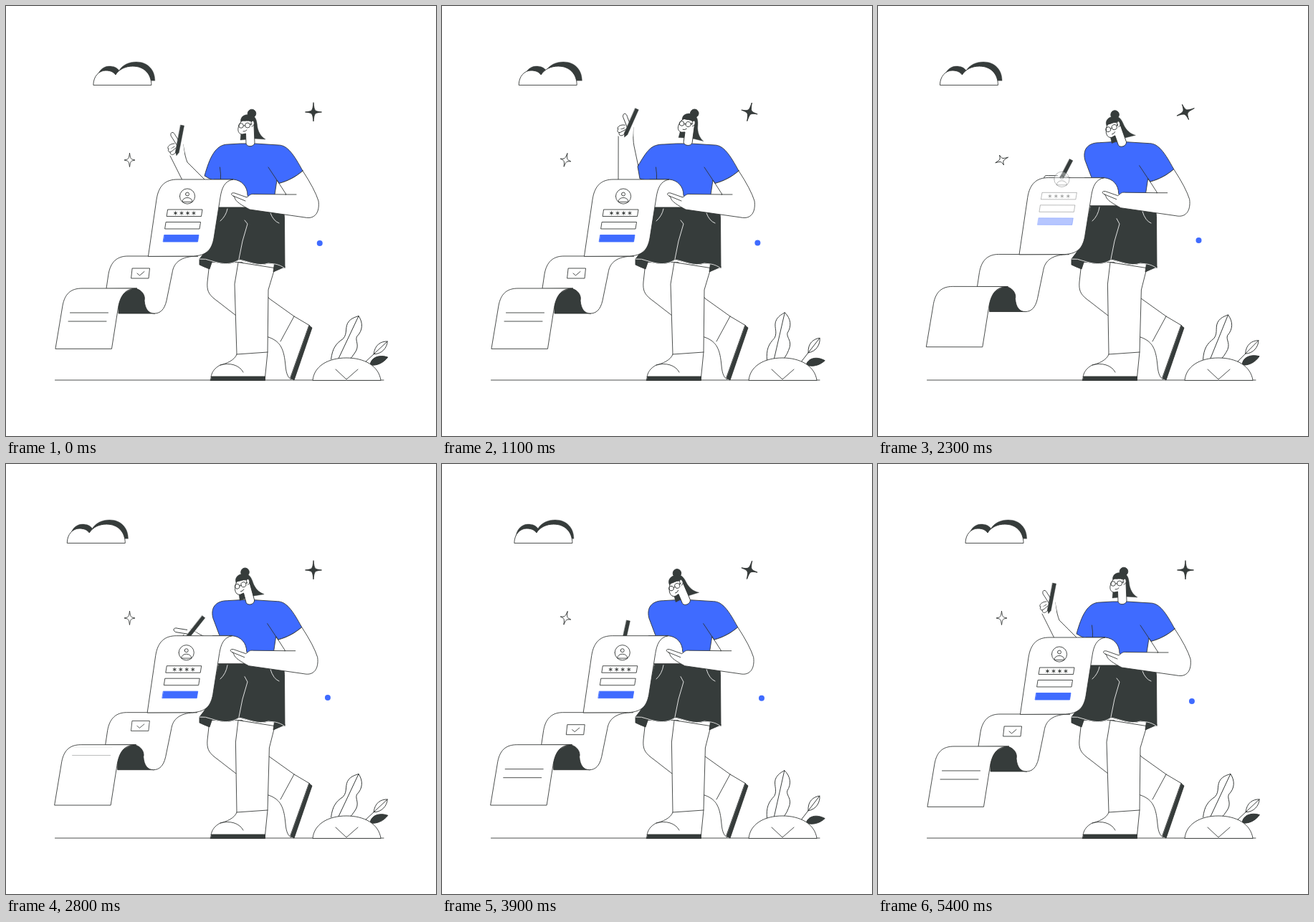
Recreate the animation shown at these times as an HTML page with a canvas. Size 600 px wide and 600 px high, loop 5500 ms.

```html
<!DOCTYPE html>
<html lang="en">
<head>
<meta charset="utf-8">
<title>Filling in the form</title>
<style>
html, body { margin: 0; width: 100%; height: 100%; overflow: hidden; background: #fff; }
canvas { display: block; width: 600px; height: 600px; }
</style>
</head>
<body>
<canvas id="stage" width="600" height="600"></canvas>
<script>
const LOOP = 5500, STEP = 100;
const INK = '#2c302f', DARK = '#363c3b', BLUE = '#3f6bff', WHITE = '#fff';
const ctx = document.getElementById('stage').getContext('2d');

// ---- timing helpers ----
const clamp = v => Math.min(1, Math.max(0, v));
const smooth = p => p * p * (3 - 2 * p);
const between = (t, a, b) => smooth(clamp((t - a) / (b - a)));
const pulse = (t, a, b, c, d) => between(t, a, b) - between(t, c, d);
const swing = (t, period, peak = 0) => Math.cos(2 * Math.PI * (t - peak) / period);

// ---- drawing helpers ----
function shape(d, fill, stroke = INK, width = 0.85) {
  const p = new Path2D(d);
  if (fill) { ctx.fillStyle = fill; ctx.fill(p); }
  if (stroke) { ctx.strokeStyle = stroke; ctx.lineWidth = width; ctx.stroke(p); }
}
const line = (d, stroke) => shape(d, null, stroke);
function circle(x, y, r, fill, stroke) {
  shape(`M${x - r},${y}a${r},${r} 0 1 1 ${2 * r},0a${r},${r} 0 1 1 ${-2 * r},0`, fill, stroke);
}
function at(x, y, deg, draw) {
  ctx.save();
  ctx.translate(x, y);
  ctx.rotate(deg * Math.PI / 180);
  draw();
  ctx.restore();
}
function faded(alpha, draw) {
  ctx.save();
  ctx.globalAlpha = clamp(alpha);
  draw();
  ctx.restore();
}

// ---- motion: how far each action has gone, 0 to 1 ----
function actions(t) {
  return {
    lift: pulse(t, 150, 1150, 1250, 1750),
    write: pulse(t, 1250, 1800, 4000, 4450),
    settle: pulse(t, 4000, 4450, 4600, 5400),
    pull: pulse(t, 1250, 1700, 1800, 2500),
    stroke: (1 - swing(t, 690, 1900)) / 2,
    nod: (1 - swing(t, 2050, 1900)) / 2
  };
}

// ---- scenery ----
function cloud(t) {
  const x = 18.5 * (swing(t, LOOP) - 1), back = 4.6 + 2.6 * swing(t, LOOP, LOOP / 4);
  const d = 'M122,110C122,98 130,90 139,90C146,90 150,92 153,96C158,88 167,84 177,84C193,84 203,95 203,110Z';
  at(x + back, -6, 0, () => shape(d, DARK, DARK, 0.4));
  at(x, 0, 0, () => shape(d, WHITE));
}

function star(x, y, rx, ry, t, fill) {
  const turn = 90 * (t % (LOOP / 2) / (LOOP / 2)) ** 2.2;
  at(x, y, turn, () => {
    ctx.beginPath();
    for (let i = 0; i <= 4; i++) {
      const a = i * Math.PI / 2, px = rx * Math.sin(a), py = -ry * Math.cos(a);
      const k = 1.3 * Math.SQRT2, b = a - Math.PI / 4;
      const cx = k * Math.sin(b), cy = -k * Math.cos(b);
      if (i) ctx.bezierCurveTo(cx, cy, cx, cy, px, py); else ctx.moveTo(px, py);
    }
    ctx.fillStyle = fill;
    ctx.strokeStyle = INK;
    ctx.lineWidth = 0.85;
    ctx.fill();
    ctx.stroke();
  });
}

function plant(t) {
  const sway = swing(t, LOOP / 2, 100);
  at(463, 494, 18.5 + 6.8 * sway, () => {
    shape('M-9,3C-14,-12 -12,-20 -6,-30C-3,-40 -12,-46 -9,-56C-7,-62 -3,-65 0,-68C10,-62 14,-52 10,-41C10,-34 20,-32 17,-18C16,-10 13,-4 9,3', WHITE);
    line('M0,0V-68');
  });
  at(500, 498, 42 + 5 * sway, () => {
    shape('M0,-18C-9,-28 -6,-38 0,-44C6,-38 8,-26 0,-18', WHITE);
    line('M0,0V-44');
  });
  at(508, 501, -20 + 7 * swing(t, LOOP / 2, 1050), () => shape('M0,0C5,-9 17,-9 27,0C18,5 8,5 0,0Z', DARK));
  shape('M428,522C430,502 450,491 475,491C500,491 520,502 523,522Z', WHITE);
  line('M460,507L475,521L491,507');
}

// ---- figure ----
function legs({ write }) {
  const knee = 1.4 * write;
  shape('M284,358L281,385C280,397 283,402 290,408L321,432L366,462C384,468 388,480 390,502C391,514 394,519 398,521L424,446L402,433L367,408L330,358Z', WHITE);
  line('M402,433L383,468');
  shape('M423,446L427,449L402,522L397,519Z', DARK);
  shape(`M324,358L${319 + knee},388L322,486C319,494 308,499 299,501C291,505 287,511 286,518H361.500L365,483L${366 + knee},396L375,366Z`, WHITE);
  line('M322,486L365,483M299,501C312,497 326,501 331,511');
  shape('M287,517H361.500V522.500H285.500Z', DARK);
}

function shorts({ write }) {
  const top = 281 - 2.3 * write;
  const hem = '366,359C352,364 338,356 325,354C312,363 298,359 288,356Q278,352 270,353';
  shape('M270,353V361Q276,364 284,367L288,355ZM389,364L373,371L375,356Z', DARK);
  shape(`M297,${top}H384Q388,${top + 3} 388.500,${top + 15}L389,366C380,359 372,360 ${hem}Q276,346 282,336Z`, DARK);
  line(`M389,366C380,359 372,360 ${hem}`, WHITE);
  line(`M333,${top + 18}L337,304L330,328L325,353M309,${top + 2}Q307,293 299,300M369,${top + 8}Q373,300 381,303`, WHITE);
}

function penArm({ lift, write, settle, stroke }) {
  const x = 240 + 19 * lift + 2 * settle + write * (13 + 3 * stroke);
  const y = 198 - 25 * lift - 7 * settle + write * (52 - 12 * stroke);
  const turn = 11 * lift + 8 * settle - write * (70 - 22 * stroke);
  const pen = 11 + 13 * lift + 17 * settle + write * (1 + 27 * stroke);
  const s = Math.sin(turn * Math.PI / 180), c = Math.cos(turn * Math.PI / 180);
  const near = (dx, dy) => `${x + dx * c - dy * s},${y + dx * s + dy * c}`;
  const elbow = dx => `${262 + dx + 14 * write},${243 + 20 * write}`;

  const inner = `${elbow(-16)}L${near(-11, 11)}`;
  const outer = `${near(7, -5)}Q${near(10, 13)} ${near(13, 20)}L${elbow(16)}`;
  shape(`M${inner}L${outer}Z`, WHITE, null);
  line(`M${inner}M${outer}`);
  at(x, y, turn, () => {
    shape('M-11,11L-14,-1L-4,-8H7L9,8Z', WHITE, null);
    shape('M-1,-3L-10,-17C-11,-23 -6,-23 -4,-18L3,-7', WHITE);
  });
  at(x, y, pen, () => shape('M-2.500,-32H2.500V6L0,11L-2.500,6Z', DARK, DARK, 0.4));
  at(x, y, turn, () => {
    shape('M-5,-6C-11,-6 -15,-2 -14,1C-13,3 -9,1 -5,-2', WHITE);
    shape('M-13,1C-15,5 -12,7 -9,5L-3,0', WHITE);
    line('M-11,6C-11,10 -7,11 -4,7L0,2');
  });
}

function torso({ lift, write, settle }) {
  const cuff = `${277 - 4 * lift - 3 * settle + 13 * write},${237 - 13 * lift - 20 * write}`;
  const pit = `${284 - 8 * lift - 3 * settle + 15 * write},241`;
  const curve = `${292 + 6 * write},193 ${284 + 3 * lift + 2 * write},${212 - 12 * lift - 13 * write}`;
  shape(`M327,192L310,193C${curve} ${cuff}L${pit}L299,246V280H340L375,263L378,243L381,247.500C394,244 405,238 414,230C402,208 393,194 380,194L348,192Z`, BLUE);
  line('M366,225L381,247.500');
  faded(1 - write, () => line('M298.500,225Q300,234 299.500,244'));
}

function head({ lift, write, settle, nod }) {
  const up = lift + settle;
  at(342 + 2 * up, 192 - up, 10 * up - write * (21 - 8 * nod), () => {
    ctx.translate(-342, -192);
    circle(343, 150, 5.8, DARK, DARK);
    shape('M328,164C325,154 334,150 341,152C350,153 350,163 351,170C353,178 357,183 362,186L346,185L327,187L328,176Z', DARK, DARK, 0.4);
    shape('M330,160C326,162 325,167 324,170C323,176 326,179 330,179L334.500,178L335,192C336,197 346,197 347,191L346,166L342,161C337,159 334,161 330,160Z', WHITE);
    shape('M342,166C341,161 345,158 346,162C347,165 345,168 343,168', WHITE);
    circle(328, 167, 3.3, null, INK);
    circle(337, 166.5, 3.5, null, INK);
    line('M340.500,165.500L343,164.500M331.400,167H333.400M331,175Q334,175.500 336,173');
  });
}

function frontArm() {
  shape('M414,230C405,238 394,244 381,247.500L391,263L346,262.500C341,262 340,264 336,267L319,261C314,260 313,263 317,265L319,267C320,273 329,278 340,284L417,295C431,298 438,288 436,272Q431,256 414,230Z', WHITE);
  line('M390,263H405M317,265L334,272');
}

// ---- paper ----
const slab = (x, y, w, h, fill, stroke) => shape(`M${x},${y}h${w}l-1.500,${h}h${-w}Z`, fill, stroke);

function form() {
  circle(253, 265.5, 10.6, WHITE, INK);
  circle(253, 262.5, 2.5, null, INK);
  line('M246,273C246,265.500 260,265.500 260,273Z');
  slab(226, 284, 48, 9.5, WHITE);
  for (let i = 0; i < 4; i++) {
    for (let a = 0; a < 180; a += 60) at(236.5 + i * 8.5, 289, a, () => line('M0,-2.300V2.300'));
  }
  slab(223.5, 301.5, 48, 9.5, WHITE);
  slab(221, 319.5, 48, 9.5, BLUE, BLUE);
}

function checkBox() {
  slab(176.5, 366, 24, 14, WHITE);
  line('M183,373L186.500,376L193,370.500');
}

// Printed matter slides down its sheet as it appears, and again as it goes.
function print(t, start, reach, draw) {
  const gone = between(t, 1250, 1700), p = between(t, start, start + 700);
  const leaving = t < 1900;
  const off = leaving ? 12 * gone : reach * (p - 1);
  faded(leaving ? 1 - gone : 1.3 * p, () => at(-0.22 * off, off, 0, () => draw()));
}

function paper(t) {
  // back of the roll, and the underside between the lower sheets
  shape('M290,242H317C329,243 337,252 337,264L345,281H290Z', WHITE);
  shape('M178,394C189,395 195,404 193,411C194,423 200,429 208,429H157V404Z', DARK);
  // middle, upper and lower sheet
  shape('M140,394L143,374C146,357 155,349 170,349H268C244,349 234,358 232,372L224,411C221,424 215,429 207,429C199,429 194,423 193,411C195,404 189,394 178,394Z', WHITE);
  shape('M198.500,349L210,270C213,250 223,242 239,242H317C305,244 301,254 299,267L290,324C287,340 280,348 262,349Z', WHITE);
  shape('M69,478L79,418C82,402 90,394 106,394H183C166,394 159,404 156,424L147.500,478Z', WHITE);

  print(t, 2150, 30, form);
  print(t, 2450, 18, checkBox);
  print(t, 2650, 44, () => line('M87,440h53'));
  print(t, 2800, 32, () => line('M89.500,428h53'));
}

// ---- stage ----
function render(t) {
  const act = actions(t);
  const bx = -1.3 * act.write, by = -2.3 * act.write;
  ctx.fillStyle = WHITE;
  ctx.fillRect(0, 0, 600, 600);
  cloud(t);
  star(429, 148, 11.5, 13, t, DARK);
  star(172.5, 215, 7.5, 9.5, t, WHITE);
  circle(443.3 - 5.7 * swing(t, LOOP, 300), 328.6 + 2.8 * swing(t, LOOP, 500), 4, BLUE, null);
  line('M68.500,522H527');
  plant(t);
  legs(act);
  shorts(act);
  penArm(act);
  at(bx, by, 0, () => torso(act));
  head(act);
  // the sheets hang from the hand and turn about it
  at(317 + bx, 262 + by, 1.6 * act.pull - 1.75 * act.settle, () => {
    ctx.translate(-317, -262);
    paper(t);
  });
  at(bx, by, 0, frontArm);
}

ctx.lineJoin = ctx.lineCap = 'round';
const start = performance.now();
function tick() {
  const step = Math.floor((performance.now() - start) / STEP) + 1;
  render(step * STEP % LOOP);
  requestAnimationFrame(tick);
}
tick();
</script>
</body>
</html>
```
